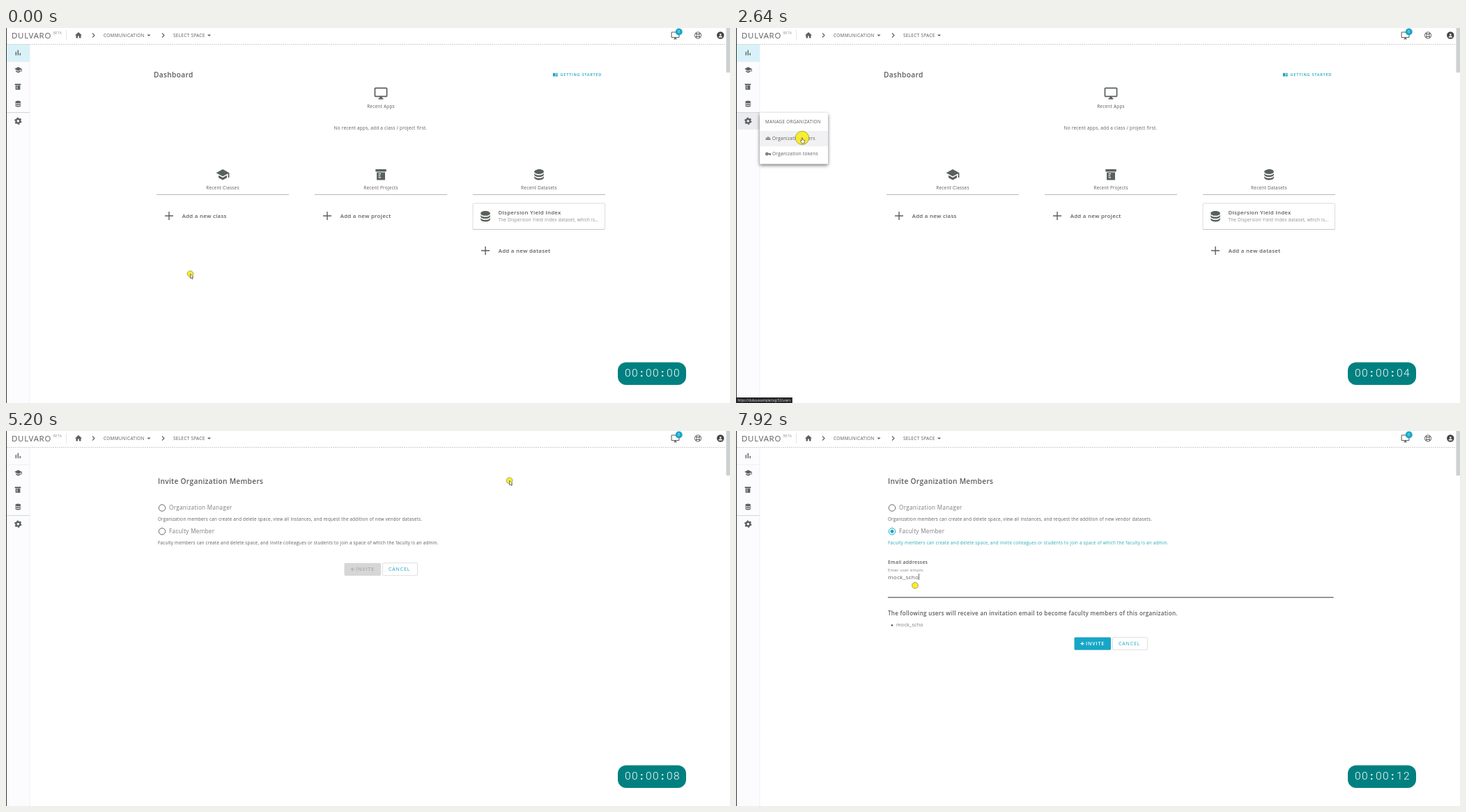
An HTML page for the animation above (8 s loop, 1039 by 539 pixels).

```html
<!DOCTYPE html>
<html lang="en">
<head>
<meta charset="utf-8">
<title>Inviting members</title>
<style>
html, body { margin: 0; width: 100%; height: 100%; overflow: hidden; background: #fff; }
svg { display: block; width: 1039px; height: 539px; font-family: "Open Sans", "Noto Sans", sans-serif; }
text { white-space: pre; }
#clock { font: 300 15.5px Roboto, sans-serif; text-anchor: middle; fill: #fff; }
</style>
</head>
<body>
<svg id="stage" viewBox="0 0 1039 539"></svg>
<script>
const INK = '#59615b', GREY = '#5c5c5c', BLUE = '#18a6c6', RING = '#666', LOOP = 8000, STEP = 80;

// Drawing helpers; text and icons are placed by their vertical centre.
const text = (x, y, str, size, o = {}) =>
  `<text x="${x}" y="${y + size * .35}" font-size="${size}" fill="${o.fill || GREY}"
    font-weight="${o.weight || 400}" letter-spacing="${(o.ls ?? .04) * size}"
    text-anchor="${o.anchor || 'start'}" ${o.id ? `id="${o.id}"` : ''}>${str}</text>`;
const rect = (x, y, w, h, fill, more = '') =>
  `<rect x="${x}" y="${y}" width="${w}" height="${h}" fill="${fill}" ${more}/>`;
const stroke = (d, color = INK, width = 1, more = '') =>
  `<path d="${d}" fill="none" stroke="${color}" stroke-width="${width}" ${more}/>`;
const circle = (x, y, r, fill, more = '') => `<circle cx="${x}" cy="${y}" r="${r}" fill="${fill}" ${more}/>`;
const group = (id, ...parts) => `<g id="${id}">${parts.join('')}</g>`;
const bold = { weight: 600 }, mid = { anchor: 'middle' };

const shapes = {
  home: 'M10 20v-6h4v6h5v-8h3L12 3 2 12h3v8z',
  chart: 'M4 9h3v11H4zM10.5 4h3v16h-3zM17 13h3v7h-3z',
  school: 'M5 13.2v4L12 21l7-3.8v-4L12 17zM12 3L1 9l11 6 9-4.9V17h2V9z',
  project: 'M3 3h18v4H3zM5 8h14v13H5zM8 10v1.5h4V10zM8 13v1.5h3V13zM8 16v1.5h4V16z',
  data: 'M12 3c-4.4 0-8 1.8-8 4s3.6 4 8 4 8-1.8 8-4-3.6-4-8-4zM4 9v3c0 2.2 3.6 4 8 4s8-1.8 8-4V9c0 2.2-3.6 4-8 4s-8-1.8-8-4zM4 14v3c0 2.2 3.6 4 8 4s8-1.8 8-4v-3c0 2.2-3.6 4-8 4s-8-1.8-8-4z',
  screen: 'M21 2H3a2 2 0 0 0-2 2v12a2 2 0 0 0 2 2h7v2H8v2h8v-2h-2v-2h7a2 2 0 0 0 2-2V4a2 2 0 0 0-2-2zM21 16H3V4h18z',
  person: 'M12 12a4 4 0 1 0 0-8 4 4 0 0 0 0 8zM4 20v-2c0-2.7 5.3-4 8-4s8 1.3 8 4v2z',
  drop: 'M6 9h12l-6 6z',
  book: 'M1 5h10v15H1zM13 5h10v15H13zM15 8v1.5h6V8zM15 11v1.5h6V11zM15 14v1.5h6V14z'
};
const icon = (name, x, y, size, fill = INK) =>
  `<path d="${shapes[name]}" fill="${fill}" fill-rule="evenodd"
    transform="translate(${x - size / 2} ${y - size / 2}) scale(${size / 24})"/>`;
const plus = (x, y, r, color = INK, w = 1.4) => stroke(`M${x - r} ${y}h${2 * r}M${x} ${y - r}v${2 * r}`, color, w);
const chevron = (x, y, dir = 1, color = INK) => stroke(`M${x - 1.5 * dir} ${y - 3}l${3 * dir} 3l${-3 * dir} 3`, color, 1.1);

const frame = () => group('chrome',
  rect(1, 23, 33, 516, '#fcfcfe'),
  rect(1, 23, 33, 25, '#d9f2fa', 'id="active"'),
  rect(1, 121, 33, 25, '#ebebf0', 'id="gearHover"'),
  stroke('M1 23.5H1033', '#cfcfcf', 1, 'stroke-dasharray="2 1"'),
  stroke('M1 48.5H34M34 24V539', '#e9e9ee', 1, 'stroke-dasharray="2 1"'),
  stroke('M1 121.5H34', '#d6d6d6'),
  rect(0, 0, 1, 539, '#333'),
  text(8, 10.5, 'DULVARO', 11.5, { ls: .06, weight: 500 }), text(68, 7.8, 'BETA', 4.5, { ls: .1, fill: '#888' }),
  stroke('M86.5 3V18', '#e6e6e6'),
  icon('home', 104, 10.5, 12), chevron(125.5, 10.5), chevron(225.5, 10.5),
  text(140, 10.5, 'COMMUNICATION', 6.5, { weight: 500 }), icon('drop', 205, 10.7, 10),
  text(240, 10.5, 'SELECT SPACE', 6.5, { weight: 500 }), icon('drop', 291.5, 10.7, 10),
  icon('screen', 960.5, 10.8, 13), circle(965.7, 5.5, 5, BLUE),
  text(965.7, 5.5, '0', 5.5, { ...mid, fill: '#fff', ls: 0 }),
  circle(993, 10.5, 4.6, 'none', `stroke="${INK}"`), circle(993, 10.5, 2, 'none', `stroke="${INK}"`),
  stroke('M989.7 7.2l2 2M996.3 7.2l-2 2M989.7 13.8l2-2M996.3 13.8l-2-2', INK, 1.6),
  circle(1025.3, 10.5, 5.2, '#444'), icon('person', 1025.3, 10.8, 8, '#fff'),
  rect(1033.5, 0, 5.5, 64, '#cdd1d2'),
  icon('chart', 17.3, 35.5, 11), icon('school', 17.5, 60.3, 11.5), icon('project', 17, 84.5, 11.5),
  icon('data', 17.3, 109, 12),
  circle(17.3, 133.7, 2.9, 'none', `stroke="${INK}" stroke-width="2.2"`),
  circle(17.3, 133.7, 4.4, 'none', `stroke="${INK}" stroke-width="1.6" stroke-dasharray="2.3"`));

const column = (x, name, label, add, addY) => [
  icon(name, x + 95, 210.8, 20.5), text(x + 95, 229.5, label, 6.4, mid),
  stroke(`M${x} 239.5h190`, '#b8b8b8'),
  plus(x + 18, addY, 6), text(x + 36.7, addY, add, 7.8, bold)].join('');

const dashboard = () => group('dashboard',
  text(212, 67, 'Dashboard', 10.2, { ...bold, ls: .03 }),
  icon('book', 788.3, 67, 7.5, BLUE), text(795.5, 67, 'GETTING STARTED', 5.6, { ...bold, ls: .13, fill: BLUE }),
  icon('screen', 538, 94, 20.5), text(538, 113, 'Recent Apps', 6.4, mid),
  text(537.5, 144, 'No recent apps, add a class / project first.', 6.4, mid),
  column(216, 'school', 'Recent Classes', 'Add a new class', 270),
  column(443, 'project', 'Recent Projects', 'Add a new project', 270),
  column(670, 'data', 'Recent Datasets', 'Add a new dataset', 320),
  rect(670, 252, 189.5, 37.5, '#fff', 'rx="1.5" stroke="#dcdcdc"'), stroke('M670 289.5h189', '#c8c8c8'),
  icon('data', 688, 270.7, 20.5),
  text(706.5, 264.8, 'Dispersion Yield Index', 7.8, bold),
  text(706.5, 275.7, 'The Dispersion Yield Index dataset, which is…', 6.3, { fill: '#8c8c8c' }));

const menu = () => group('menu',
  rect(34, 122, 98, 73.5, '#fff', 'rx="1.5" style="filter:drop-shadow(0 2px 2.5px #0008)"'),
  rect(34, 148, 98, 22, '#f1f1f3', 'id="itemHover"'),
  text(42, 135, 'MANAGE ORGANIZATION', 6.4),
  icon('person', 43.8, 158.8, 5), icon('person', 48.2, 158.8, 5), icon('person', 46, 158.3, 6),
  text(52, 158.5, 'Organization users', 6.5),
  circle(44.3, 181, 1.5, 'none', `stroke="${INK}" stroke-width="1.4"`),
  stroke('M46 181h4M49 181v2', INK, 1.4), text(52, 181, 'Organization tokens', 6.5));

const members = [
  ['Dorvan Meku', 'meku.dorvan@brintcast.example', 'MANAGER'],
  ['Mock Scholar 1', 'mock_scholar_1@dulva.example', 'MEMBER'],
  ['Mock Counsellor', 'mock_counsellor@dulva.example', 'FACULTY'],
  ['Mock Scholar 2', 'mock_scholar_2@dulva.example', 'MEMBER']];
const memberRow = ([name, mail, role], i) => {
  const y = 128.7 + i * 24.45, o = { ls: .03, fill: '#666' };
  return stroke(`M212 ${y - 12.2}H863.5`, '#bdbdbd') + icon('person', 224, y, 8.5) +
    text(230, y, name, 7.2, o) + text(368, y, mail, 7.2, o) + text(605.3, y, role, 7.2, o) +
    rect(700.7, y - 6.3, 31.3, 12.3, '#08d383', 'rx="6.2"') +
    text(716.5, y - .2, 'Active', 6.4, { ...bold, ...mid, fill: '#fff' }) +
    stroke(`M${817.7} ${y - 2.3}l5 5m0 -5l-5 5`, '#444', .9);
};
const users = () => group('users',
  text(212, 66, 'Organization Users', 10.2, { ...bold, ls: .03 }),
  text(212, 78.7, '4 USERS FOUND', 6, { ls: .06 }),
  plus(709, 71, 2.5, GREY, 1.1), text(714, 71, 'ADD ORGANIZATION MEMBER', 7.3, { ...bold, ls: .105 }),
  circle(853.5, 70, 2.8, 'none', 'stroke="#444" stroke-width="1.2"'), stroke('M855.5 72l3.3 3.3', '#444', 1.5),
  [[220, 'User name'], [368, 'Email'], [605.3, 'Role'], [700.5, 'Status'], [804, 'Actions']]
    .map(([x, s]) => text(x, 104, s, 6.2, { weight: 500 })).join(''),
  members.map(memberRow).join(''),
  text(667, 229.3, 'Rows per page:', 6.05), text(730, 229.3, '100', 6.2), icon('drop', 751.3, 229.5, 10),
  stroke('M730 238h26.5', '#aaa'), text(776.5, 229.3, '1-4 of 4', 6.1),
  chevron(825, 229.3, -1, '#999'), chevron(851, 229.3, 1, '#999'));

const option = (y, label, note, id) =>
  circle(224, y, 4.7, 'none', `stroke="${RING}" stroke-width="1" id="${id}Ring"`) +
  text(234, y, label, 8.1, { fill: '#7c7c7c' }) +
  text(218, y + 16.3, note, 6.25, { id: id + 'Note' });
const invite = () => group('invite',
  text(218, 72, 'Invite Organization Members', 10.2, { ...bold, ls: .03 }),
  option(110.5, 'Organization Manager', 'Organization members can create and delete space, view all instances, and request the addition of new vendor datasets.', 'manager'),
  option(144.3, 'Faculty Member', 'Faculty members can create and delete space, and invite colleagues or students to join a space of which the faculty is an admin.', 'faculty'),
  circle(224, 144.3, 2.5, BLUE, 'id="dot"'),
  group('field',
    text(218, 189, 'Email addresses', 6.85, bold),
    `<text id="label" x="218" fill="#808080">Enter user emails</text>`,
    text(218, 209.7, '', 8, { id: 'typed' }),
    stroke('M218 239.2H857.5', '#8a8a8a', .9), stroke('', '#606060', 1, 'id="focus"'),
    stroke('', '#444', .8, 'id="caret"')),
  group('list',
    text(218, 262, 'The following users will receive an invitation email to become faculty members of this organization.', 8.03, bold),
    circle(224, 279.3, 1.3, '#555'), text(230, 279, '', 7.05, { id: 'echo', fill: '#777' })),
  group('buttons',
    rect(485.5, -9, 52.5, 18.2, '#d6d6d6', 'rx="1.5" id="send"'),
    group('sendLabel', stroke('M494.5 0h5M497 -2.5v5', 'currentColor', 1.1),
      text(502, 0, 'INVITE', 7, { ...bold, ls: .12, fill: 'currentColor' })),
    rect(540.5, -9, 50, 18, '#fff', 'rx="1.5" stroke="#dedede"'),
    text(549, 0, 'CANCEL', 7, { weight: 500, ls: .12, fill: BLUE })));

// The clock keeps every character in a cell of its own.
const clockCells = () => [...'00:00:00'].map((c, i) =>
  `<tspan x="${892.2 + 10 * i}" ${c === ':' ? 'font-weight="700"' : ''}>${c}</tspan>`).join('');

const overlay = () => group('overlay',
  rect(0, 531, 116, 8, '#26282b', 'id="statusBox"'), text(2.5, 535, '', 4.6, { id: 'status', fill: '#ddd', ls: 0 }),
  rect(878, 480.5, 98, 32.5, '#008080', 'rx="12"'),
  `<text id="clock" y="500.7">${clockCells()}</text>`,
  group('cursor', circle(0, 0, 4.5, '#f8ec24', 'id="spot" stroke="#8a8638" stroke-width=".7" fill-opacity=".95"'),
    stroke('M0 0V6.5L1.6 5.1L2.7 7.5L3.7 7L2.6 4.7H4.6Z', '#444', .7, 'id="arrow" style="fill:#fff"'),
    stroke('M-.8 0V4L-2 3.2L-2.4 4L-.7 7.8H3L3.8 3.5L.6 2.6V0Z', '#444', .7, 'id="hand" style="fill:#fff"')));

stage.innerHTML = [frame(), dashboard(), users(), invite(), menu(), overlay()].join('');

const $ = id => document.getElementById(id);
const set = (id, attrs) => { for (const k in attrs) $(id).setAttribute(k, attrs[k]); };
const show = (id, on) => $(id).style.display = on ? '' : 'none';
const clamp = v => Math.max(0, Math.min(1, v));
const smooth = v => v * v * (3 - 2 * v);
const within = (t, a, b) => t >= a && t < b;

// Each move: start, end, target x, target y.
const START = [264.5, 353.5];
const moves = [
  [960, 1760, 19.5, 133.5], [1840, 2400, 95, 158], [2800, 3040, 120, 145.5],
  [3200, 4000, 743.5, 68], [5120, 5760, 255.5, 145], [6080, 6400, 257, 222]];
const clicks = [2720, 5040, 6000, 6480];
const keys = [7040, 7120, 7280, 7520, 7600, 7760, 7840, 7920, 7920];
const ADDRESS = 'mock_scho', URL_BASE = 'https://dulva.example/org/32/users';

function pointer(t) {
  let [x, y] = START;
  for (const [a, b, tx, ty] of moves) {
    const k = smooth(clamp((t - a) / (b - a)));
    x += (tx - x) * k;
    y += (ty - y) * k;
  }
  return [x, y];
}

function draw(t) {
  const page = t < 2800 ? 'dashboard' : t < 5120 ? 'users' : 'invite';
  for (const id of ['dashboard', 'users', 'invite']) show(id, id === page);
  show('active', page === 'dashboard');
  show('gearHover', within(t, 1600, 2800));
  show('menu', within(t, 1680, 2800));
  show('itemHover', within(t, 2160, 2800));

  const url = within(t, 2160, 2800) ? URL_BASE : within(t, 3920, 5120) ? URL_BASE + '/invite-members' : '';
  $('status').textContent = url;
  show('statusBox', url);
  if (url) set('statusBox', { width: $('status').getComputedTextLength() + 5 });

  const chosen = t >= 6080;
  show('dot', chosen);
  show('field', chosen);
  set('facultyRing', { stroke: chosen ? BLUE : RING });
  set('facultyNote', { fill: chosen ? '#25aab8' : GREY });

  const p = 1 - (1 - clamp((t - 6400) / 240)) ** 2, size = 7.75 - 1.95 * p;
  set('label', { y: 208.5 - 8.5 * p + size * .35, 'font-size': size, 'letter-spacing': size * .04 });
  set('focus', { d: `M${537.7 - 319.8 * p} 239.2h${639.6 * p}` });
  const typed = ADDRESS.slice(0, keys.filter(k => t >= k).length);
  $('typed').textContent = $('echo').textContent = typed;
  const caretX = 218.3 + (typed && chosen ? $('typed').getComputedTextLength() : 0);
  set('caret', { d: `M${caretX} 205v9` });
  show('caret', t >= 6400 && !within(t, 6800, 7040));

  show('list', typed);
  set('buttons', { transform: `translate(0 ${typed ? 305.6 : chosen ? 271.5 : 198.7})` });
  set('send', { fill: typed ? BLUE : '#d6d6d6' });
  $('sendLabel').style.color = typed ? '#fff' : '#a9a9a9';

  const seconds = String(Math.floor((t + 160) / 640)).padStart(2, '0');
  const cells = $('clock').children;
  cells[6].textContent = seconds[0];
  cells[7].textContent = seconds[1];

  const grow = Math.max(...clicks.map(c => clamp(1 - Math.abs(t - c) / 160)));
  set('cursor', { transform: `translate(${pointer(t)})` });
  set('spot', { r: 4.4 + 10.6 * grow });
  const hand = within(t, 1600, 2800) || within(t, 3920, 5120) || within(t, 5680, 6240);
  show('hand', hand);
  show('arrow', !hand && t < 6240);
}

function tick() {
  draw(Math.floor(performance.now() % LOOP / STEP) * STEP);
  requestAnimationFrame(tick);
}
tick();
</script>
</body>
</html>
```
